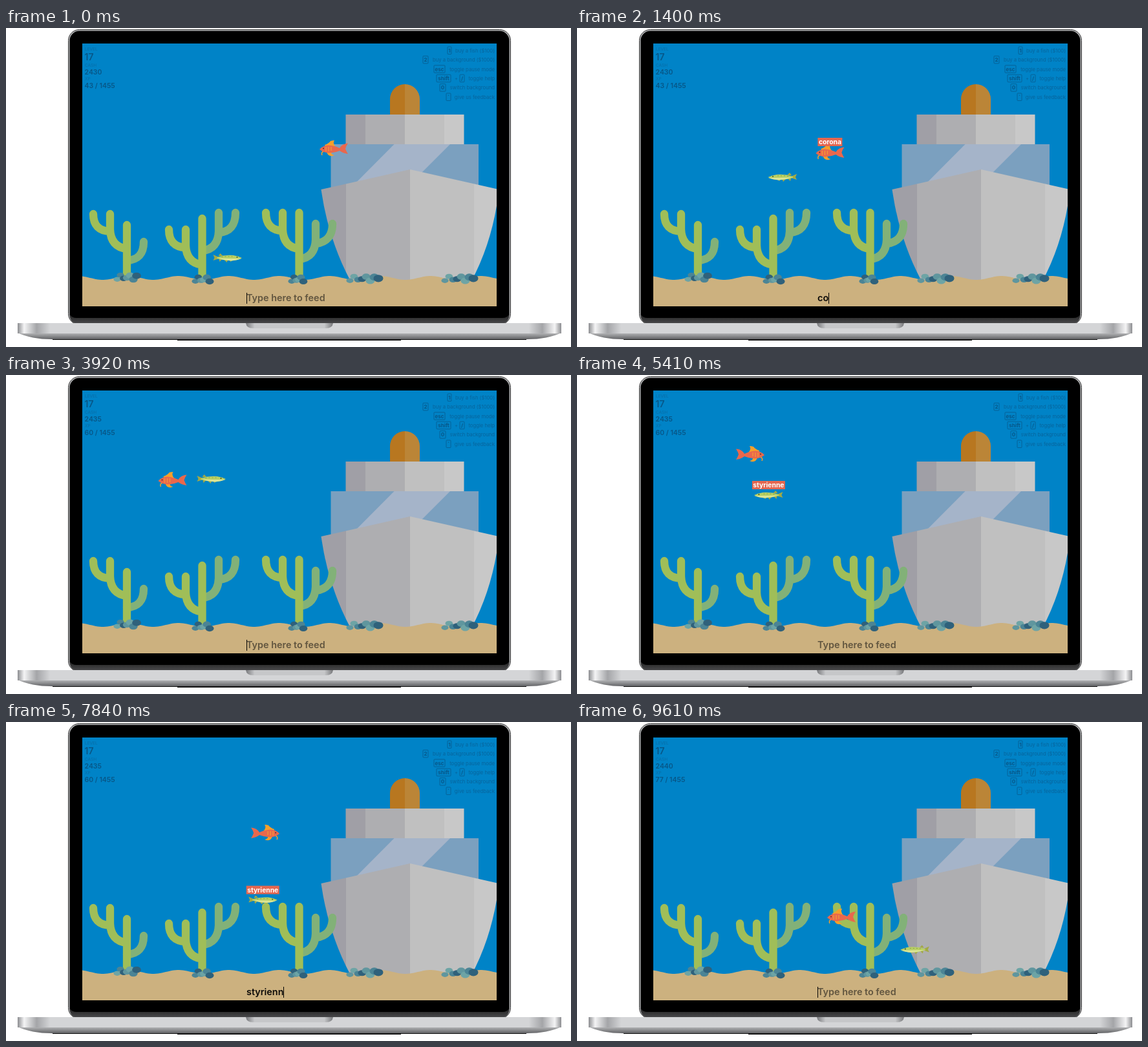
Recreate the animation shown at these times as an HTML page. Size 874 by 494 pixels, loop 9640 ms.

```html
<!DOCTYPE html>
<html lang="en">
<head>
<meta charset="utf-8">
<title>Typing aquarium</title>
<style>
  html, body { margin: 0; width: 100%; height: 100%; overflow: hidden; background: #fff; }
  svg { display: block; width: 874px; height: 494px; font-family: Inter, sans-serif; }
  .cactus path { fill: none; stroke: #a0be58; stroke-width: 12.3; stroke-linecap: round; }
  .cactus .back { stroke: #82b178; }
  .hud { font-weight: 600; font-size: 10.5px; fill: #075788; }
  .hud .cap { font-weight: 400; font-size: 6.5px; fill: #076ca6; }
  .help { font-size: 7.7px; fill: #07649b; text-anchor: end; }
  .help .key { font-weight: 700; font-size: 8px; text-anchor: middle; fill: #075788; }
  .help rect { fill: none; stroke: #075f94; stroke-width: .9; }
  .tag { font-weight: 700; font-size: 10.3px; fill: #fff; text-anchor: middle; }
  .entry { font-weight: 600; font-size: 14.4px; }
</style>
</head>
<body>
<svg viewBox="0 0 874 494">
  <defs>
    <linearGradient id="edge">
      <stop offset="0" stop-color="#8c8d90"/><stop offset=".012" stop-color="#f4f4f5"/>
      <stop offset=".035" stop-color="#a4a5a8"/><stop offset=".06" stop-color="#d4d5d7"/>
      <stop offset=".94" stop-color="#d4d5d7"/><stop offset=".965" stop-color="#a4a5a8"/>
      <stop offset=".988" stop-color="#f4f4f5"/><stop offset="1" stop-color="#8c8d90"/>
    </linearGradient>
    <linearGradient id="under" x2="0" y2="1">
      <stop offset="0" stop-color="#b8b9bb"/><stop offset="1" stop-color="#626366"/>
    </linearGradient>
    <linearGradient id="hinge" x2="0" y2="1">
      <stop offset="0" stop-color="#222"/><stop offset="1" stop-color="#4a4a4c"/>
    </linearGradient>
    <linearGradient id="notch">
      <stop offset="0" stop-color="#77787b"/><stop offset=".1" stop-color="#c6c7c9"/>
      <stop offset=".9" stop-color="#c6c7c9"/><stop offset="1" stop-color="#77787b"/>
    </linearGradient>
    <clipPath id="screen"><rect x="118" y="24" width="641" height="407"/></clipPath>
    <clipPath id="hull"><path d="M487.500 250L625 219L762.500 250Q754 328 720 392H533Q498 326 487.500 250Z"/></clipPath>
  </defs>

  <!-- laptop -->
  <rect x="96.500" y="2.500" width="684" height="457" rx="17" fill="#b4b5b7" stroke="#333"/>
  <rect x="98.500" y="4.500" width="680" height="454" rx="15"/>
  <path d="M99 444Q102 449 109 449H768Q775 449 778 444Q778 458 765 458H112Q99 458 99 444Z" fill="url(#hinge)"/>
  <path d="M18 472H859Q838 482 806 482H71Q39 482 18 472Z" fill="url(#under)"/>
  <rect x="18" y="457" width="841" height="16" fill="url(#edge)"/>
  <path d="M371 457H506Q505 465 495 465H382Q372 465 371 457Z" fill="url(#notch)"/>
  <path d="M72 482.500H805M265 483.500H611" stroke="#111"/>

  <g clip-path="url(#screen)">
    <rect x="118" y="24" width="641" height="407" fill="#0083c7"/>

    <!-- ship -->
    <path d="M594 134V110A23 23 0 0 1 617 87V134Z" fill="#b87720"/>
    <path d="M617 134V87A23 23 0 0 1 640 110V134Z" fill="#bb8537"/>
    <g id="deck"></g>
    <rect x="502.500" y="180" width="228.500" height="70" fill="#7ba0bf"/>
    <path d="M600.500 180H687L617 250H531Z" fill="#a5b4c9"/>
    <g id="body" clip-path="url(#hull)"></g>

    <path id="sand" fill="#ccb17f"/>
    <g class="cactus">
      <path class="back" d="M213 331Q213 359 187 360"/>
      <path d="M135 288Q135 314 161 315M161 288V312Q162 339 187 342M187 305V384"/>
      <path class="back" d="M329 286V315Q328 342 304 345M355 286Q355 315 329 317"/>
      <path d="M252 312Q252 339 278 340M278 312V337Q279 363 303 367M303.500 295V386"/>
      <path class="back" d="M479 303V328Q478 355 454 358M505 303Q505 331 479 334"/>
      <path d="M402 286Q402 313 428 314M428 286V312Q429 339 453 342M453.500 286V386"/>
    </g>
    <g id="rocks"></g>

    <g class="hud">
      <text class="cap" x="122" y="34.500">LEVEL</text>
      <text x="121.500" y="49.500" font-size="14">17</text>
      <text class="cap" x="122" y="60">CASH</text>
      <text id="cash" x="121.500" y="72"></text>
      <text class="cap" x="122" y="81">XP</text>
      <text id="xp" x="121.500" y="93"></text>
    </g>
    <g class="help" id="help"></g>

    <g id="pike">
      <g class="flip">
        <path d="M13-1L22-5L20 0L22 4L13 1ZM7-3L11-7L14-3ZM-1 3L1 7L5 3ZM8 2L12 6L13 2ZM-8 3L-5 6L-3 3Z" fill="#a2a945"/>
        <path d="M-22.500 0Q-16-3-9-4Q4-5 16-1V1Q6 4-6 4.500Q-15 4-22.500 0Z" fill="#b8cf63"/>
        <path d="M-22 1Q-8 1 15 .5Q5 4-6 4.500Q-15 4-22 1Z" fill="#dce596"/>
        <path d="M-8-2h2M-3-2h2M2-2h2M7-1.500h2" stroke="#87a04b"/>
        <circle cx="-15" cy="-1" r=".9" fill="#354525"/>
      </g>
      <g class="tag"><rect x="-25.500" y="-22" width="51" height="13" fill="#e56750"/><text y="-12">styrienne</text></g>
    </g>
    <g id="gold">
      <g class="flip">
        <path d="M-14-6Q-8-8-5-12Q-2-13 1-13Q-2-8 3-3L-4 4Q-5 9 1 10Q-8 14-11 5Z" fill="#f5a02b"/>
        <path d="M-16 4Q-20 6-18 10" fill="none" stroke="#f5a02b" stroke-width="1.500"/>
        <path d="M-22 1Q-17-5-8-5.500Q1-5 9-1Q13-8 22-8.500Q19-4 18 0Q20 5 22 8Q14 7 9 3Q2 6-7 6.500Q-16 6-22 1Z" fill="#e9684d"/>
        <path d="M-12-3V4M-8-3V4M-4-3V3" stroke="#f39a35" stroke-width="1.300"/>
        <circle cx="-16" cy="-.500" r="1" fill="#57302c"/>
      </g>
      <g class="tag"><rect x="-19" y="-23" width="38" height="13" fill="#e56750"/><text y="-13">corona</text></g>
    </g>

    <text id="entry" class="entry" x="372" y="423"></text>
    <rect id="caret" y="410" width="1" height="17"/>
  </g>
</svg>

<script>
const $ = id => document.getElementById(id);
const add = (parent, tag, attrs, text = '') => {
  const el = document.createElementNS('http://www.w3.org/2000/svg', tag);
  for (const k in attrs) el.setAttribute(k, attrs[k]);
  el.textContent = text;
  return parent.appendChild(el);
};

// Vertical bands of grey shading, bounded by x positions
const greys = ['#a09fa6', '#aeaeb1', '#c0c0c0', '#c8c8c8'];
const bands = (id, y, height, xs) => greys.forEach((fill, i) =>
  add($(id), 'rect', { x: xs[i], y, width: xs[i + 1] - xs[i], height, fill }));
bands('deck', 134, 46.5, [525.5, 556, 617, 678, 708.5]);
bands('body', 215, 180, [486, 526, 625, 724, 764]);

let dunes = 'M118 431';
for (let x = 118; x <= 760; x += 3)
  dunes += `L${x} ${(387 - 3 * Math.cos((x - 267) * Math.PI / 39)).toFixed(1)}`;
$('sand').setAttribute('d', dunes + 'V431Z');

// Rock piles: centre x, y, spread
const tones = ['#5f969e', '#2f617b', '#4b8495', '#6da4a5'];
[[187, 386, 15], [304, 389, 11], [451, 389, 9], [554, 388, 22], [701, 388, 22]]
  .forEach(([cx, cy, spread]) => {
    const n = Math.round(4 + spread / 6);
    for (let i = 0; i < n; i++) {
      const side = 2 * i / (n - 1) - 1, size = spread / 22 * (1 + side);
      add($('rocks'), 'ellipse', {
        cx: cx + spread * side, cy: cy + 3.5 * Math.sin(i * 2.4 + 2),
        rx: 5.5 + size, ry: 3.7 + size, fill: tones[(n - i) % 4]
      });
    }
  });

// Help rows: text, then keys as [label, x, width]
[['buy a fish ($100)', ['1', 683, 6]],
 ['buy a background ($1000)', ['2', 645, 8]],
 ['toggle pause mode', ['esc', 662, 17]],
 ['toggle help', ['shift', 666, 22], ['/', 702, 7]],
 ['switch background', ['0', 671, 9]],
 ['give us feedback', ['`', 681, 7]]
].forEach(([text, ...keys], i) => {
  const y = 35 + i * 14.4, help = $('help');
  add(help, 'text', { x: 756, y: y + 2.7 }, text);
  for (const [label, x, width] of keys) {
    add(help, 'rect', { x, y: y - 6, width, height: 11.5, rx: 1 });
    add(help, 'text', { class: 'key', x: x + width / 2, y: y + 2.8 }, label);
  }
  if (keys[1]) add(help, 'text', { x: 699, y: y + 2.7 }, '+');
});

const LOOP = 9640;

// Each fish swims through a few points [time, x, y]; its word is shown from
// `hungry`, typed between `from` and `fed`, and then pays out.
const fishes = [
  { id: 'gold', word: 'corona', hungry: 640, from: 1255, fed: 2110, path: [
    [0, 507, 187], [700, 476, 169], [1400, 391.5, 193], [2300, 316, 212], [2850, 298.5, 209],
    [3920, 257.5, 163], [4700, 245, 151], [5410, 268, 123], [6900, 341, 58],
    [7840, 401, 172], [8700, 441, 268], [9640, 408, 303]] },
  { id: 'pike', word: 'styrienne', hungry: 5400, from: 6150, fed: 8080, path: [
    [0, 342.5, 356], [500, 350, 312], [1400, 318, 231], [2600, 276, 122], [2850, 282.5, 124],
    [3920, 317.5, 161], [4890, 324, 175.5], [5410, 296.5, 186], [6230, 239, 212], [6900, 223, 223],
    [7840, 397, 275.5], [8800, 571, 338], [9640, 521, 353]] }
];

// Smooth curve through the points that never overshoots: flat at turning points
function along(path, t, axis) {
  const last = path.length - 1;
  const slope = i => (path[i + 1][axis] - path[i][axis]) / (path[i + 1][0] - path[i][0]);
  const tangent = i => {
    const a = slope(Math.max(0, i - 1)), b = slope(Math.min(last - 1, i));
    return a * b > 0 ? 2 * a * b / (a + b) : 0;
  };
  let i = 0;
  while (i < last - 1 && path[i + 1][0] <= t) i++;
  const span = path[i + 1][0] - path[i][0], u = (t - path[i][0]) / span, v = 1 - u;
  return path[i][axis] * v * v * (1 + 2 * u) + path[i + 1][axis] * u * u * (3 - 2 * u)
    + span * u * v * (tangent(i) * v - tangent(i + 1) * u);
}

function swim({ id, path, hungry, fed }, t) {
  const x = along(path, t, 1), y = along(path, t, 2);
  const dir = along(path, t + 1, 1) > x ? -1 : 1;
  $(id).setAttribute('transform', `translate(${x.toFixed(1)} ${y.toFixed(1)})`);
  $(id).querySelector('.flip').setAttribute('transform', `scale(${dir} 1)`);
  $(id).querySelector('.tag').style.display = t >= hungry && t < fed ? '' : 'none';
}

function draw(t) {
  fishes.forEach(fish => swim(fish, t));

  const meals = fishes.filter(fish => t >= fish.fed).length;
  $('cash').textContent = 2430 + 5 * meals;
  $('xp').textContent = `${43 + 17 * meals} / 1455`;

  const target = fishes.find(fish => t > fish.from && t < fish.fed);
  const entry = $('entry');
  if (target) {
    const { word, from, fed } = target;
    entry.textContent = word.slice(0, Math.ceil(word.length * (t - from) / (fed - from)));
  } else {
    entry.textContent = 'Type here to feed';
  }
  entry.setAttribute('fill', target ? '#0d0b08' : '#61553f');
  $('caret').setAttribute('x', 372 + (target ? Math.round(entry.getComputedTextLength()) : 0));
  const blink = (t + 230) % (LOOP / 5) < 800;
  $('caret').style.display = target || blink ? '' : 'none';
}

const start = performance.now();
function tick() {
  draw((performance.now() - start) % LOOP);
  requestAnimationFrame(tick);
}
tick();
</script>
</body>
</html>
```
